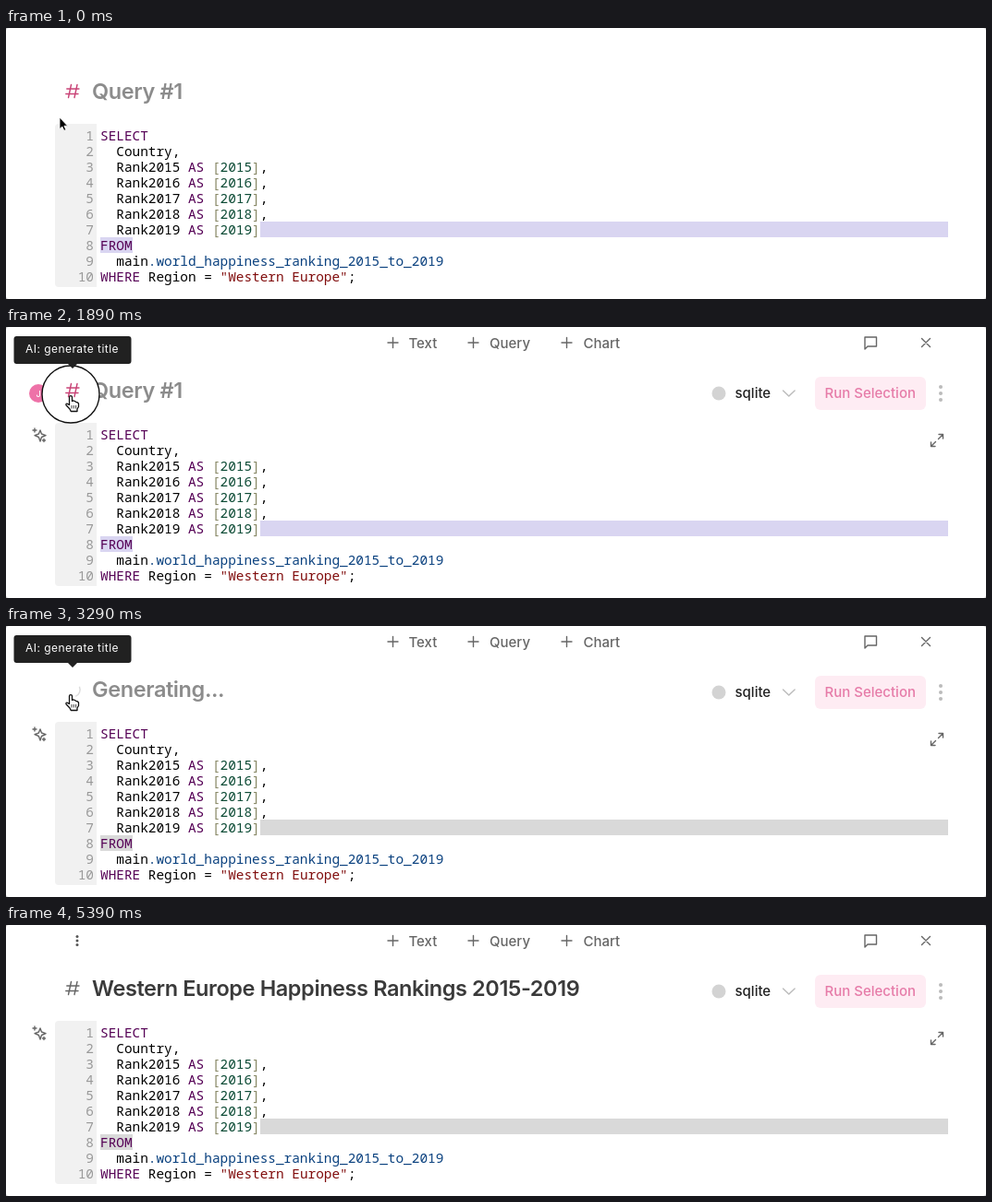
An HTML page that plays this animation: 1060 by 294 pixels, repeating every 5.67 s.

```html
<!DOCTYPE html>
<html lang="en">
<head>
<meta charset="utf-8">
<title>Generate a query title</title>
<style>
html, body { margin: 0; width: 100%; height: 100%; overflow: hidden; background: #c4c4c4; }
svg { display: block; width: 1060px; height: 294px; font: 500 15px Inter, sans-serif; }
text { white-space: pre; }
.line { fill: none; stroke: #666; stroke-width: 1.4; stroke-linecap: round; stroke-linejoin: round; }
.menu { fill: #666; }
.code { font: 500 14.4px "Noto Sans Mono", monospace; fill: #000; }
.num { fill: #999; font-weight: 400; text-anchor: end; }
.k { fill: #505; }
.n { fill: #0b4a34; }
.b { fill: #886; }
.v { fill: #0a417f; }
.s { fill: #800c0c; }
#title { font-size: 23.5px; font-weight: 600; letter-spacing: -.4px; }
#tip text { font-size: 12px; font-weight: 400; letter-spacing: .45px; fill: #fff; }
</style>
</head>
<body>
<svg viewBox="0 0 1060 294">
  <rect width="1060" height="294" rx="3" fill="#fff"/>
  <path d="M98 104H57a4 4 0 0 0-4 4V277a4 4 0 0 0 4 4H98z" fill="#f1f1f1"/>
  <path id="selection" d="M275 210H1019V227H275zM102 227H137V244H102z"/>
  <g id="code" class="code"></g>
  <text id="title" x="93" y="77"></text>

  <g id="controls">
    <g fill="#555"><circle cx="77" cy="12.5" r="1.5"/><circle cx="77" cy="17" r="1.5"/><circle cx="77" cy="21.5" r="1.5"/></g>
    <path class="line" d="M413 17h11m-5.5-5.5v11M500 17h11m-5.5-5.5v11M601 17h11m-5.5-5.5v11"/>
    <g class="menu"><text x="435.500" y="22.5">Text</text><text x="523" y="22.5">Query</text><text x="624.500" y="22.5">Chart</text></g>
    <path class="line" d="M929 11h12.5v10H932l-3 3zM990.5 12.500l9 9m0-9l-9 9"/>
    <circle cx="771" cy="72" r="7.5" fill="#d3d3d3"/>
    <text x="788.500" y="77" fill="#222">sqlite</text>
    <path class="line" style="stroke:#bbb" d="M840.500 69l6.300 6 6.300-6"/>
    <rect x="875" y="54" width="120" height="36" rx="6" fill="#feecf3"/>
    <text x="885.500" y="77" fill="#e67ba8">Run Selection</text>
    <g fill="#bbb"><circle cx="1011" cy="65" r="2"/><circle cx="1011" cy="72" r="2"/><circle cx="1011" cy="79" r="2"/></g>
    <path class="line" d="M1008.500 121.500l5-5m-4.500 0h4.500v4.500M1005.500 124.500l-5 5m0-4.500v4.500h4.500"/>
    <path class="line" d="M37 112l1.500 4 4.500 1.700-4.500 1.800-1.500 4.500-1.600-4.500-4.400-1.800 4.400-1.700zM31 110v4m-2-2h4M41 121.500v3m-1.500-1.500h3"/>
  </g>

  <g id="avatar">
    <circle cx="35" cy="72" r="10" fill="#ee72a8"/>
    <text x="35" y="75.500" text-anchor="middle" fill="#fff" style="font-size:9px">J</text>
  </g>
  <circle id="ring" cx="70" cy="73" fill="#fff" stroke="#111" stroke-width="1.400"/>
  <path id="hash" class="line" d="M70.500 61.500l-3 14M77 61.500l-3 14M65.800 66H79M64.800 71.500H78"/>
  <path id="spinner" d="M66.300 74.700A8 8 0 0 1 66.300 63.300" fill="none" stroke="#ddd" stroke-width="1.500"/>
  <g id="tip">
    <path d="M11.500 10H132.500a3 3 0 0 1 3 3V37a3 3 0 0 1-3 3H77l-5 5-5-5H11.500a3 3 0 0 1-3-3V13a3 3 0 0 1 3-3z" fill="#212121"/>
    <text x="21" y="28">AI: generate title</text>
  </g>

  <g id="cursor">
    <path id="arrow" d="M0 0V12.500L2.800 10 4.800 14.300 6.800 13.400 4.900 9.200H8.600z" stroke="#fff" stroke-width=".8"/>
    <g id="hand" stroke="#111" stroke-width="1.300" stroke-linejoin="round">
      <path fill="#fff" d="M-1.500 10V1.600a1.500 1.500 0 0 1 3 0V6l1.300-.6 1.700.6 1.100.8 1.700.5 1.200 1.200V12l-1.500 2.500V17H.2L-1 14.500-4.800 10.500c-1-1.400.5-2.600 1.800-1.400z"/>
      <path d="M1 10.500v3.500m2.300-3.500v3.500m2.300-3.500v3.500" stroke-width=".8"/>
    </g>
    <path id="beam" d="M-3.500-5q2.500 0 3.500 2 1-2 3.500-2M0-3V4M-3.500 6q2.500 0 3.500-2 1 2 3.500 2M-2 1.500H2" fill="none" stroke="#111" stroke-width="1.200"/>
  </g>
</svg>
<script>
const $ = id => document.getElementById(id);
const set = (id, attrs) => { for (const key in attrs) $(id).setAttribute(key, attrs[key]); };
const show = (id, on) => set(id, { opacity: +on });
const ramp = (t, from, to) => Math.min(1, Math.max(0, (t - from) / (to - from)));
const mix = (a, b, p) => a + (b - a) * p;
const span = (name, text) => `<tspan class="${name}">${text}</tspan>`;

const rankLine = (year, end) =>
  `  Rank${year} ${span("k", "AS")} ${span("b", "[")}${span("n", year)}${span("b", "]")}${end}`;
const lines = [
  span("k", "SELECT"),
  "  Country,",
  ...[2015, 2016, 2017, 2018, 2019].map(year => rankLine(year, year < 2019 ? "," : "")),
  span("k", "FROM"),
  "  main" + span("v", ".world_happiness_ranking_2015_to_2019"),
  `${span("k", "WHERE")} Region = ${span("s", '"Western Europe"')};`
];
$("code").innerHTML = lines.map((line, i) => {
  const y = 122 + i * 17;
  return `<text class="num" x="95" y="${y}">${i + 1}</text><text x="102" y="${y}">${line}</text>`;
}).join("");

const LOOP = 5670, STEP = 70;
const HOVER = 140, PRESS = 1890, GENERATE = 2520, DONE = 3780, LEAVE = 4620;

function drawCursor(t) {
  const enter = ramp(t, 0, 280);
  const exit = Math.max(0, (t - LEAVE + STEP) / 350) ** 2;
  const x = mix(mix(58, 70, enter), 517, exit);
  const y = mix(mix(97, 74.5, enter), 288, exit);
  const shape = x > 85 ? "beam" : enter < 1 ? "arrow" : "hand";
  for (const id of ["arrow", "hand", "beam"]) show(id, id === shape);
  set("cursor", { transform: `translate(${x} ${y})` });
}

function draw(t) {
  const generating = t >= GENERATE && t < DONE;
  const done = t >= DONE;
  $("title").textContent = done ? "Western Europe Happiness Rankings 2015-2019"
    : generating ? "Generating..." : "Query #1";
  set("title", { fill: done ? "#3a3a3a" : "#8c8c8c" });
  set("selection", { fill: t > PRESS ? "#d9d9d9" : "#d9d5f1" });
  show("controls", t >= HOVER);
  show("avatar", t >= 490 && t < GENERATE);

  $("hash").style.stroke = !done ? "#c94477" : t < LEAVE + STEP ? "#b8b8b8" : "#666";
  show("hash", !generating);
  show("spinner", generating);
  set("spinner", { transform: `rotate(${(t - 2730) * 0.36} 72 69)` });

  const pulse = ramp(t, PRESS, 2170);
  set("ring", { r: mix(31, 36, pulse), opacity: t < PRESS ? 0 : 1 - pulse });
  set("tip", { opacity: ramp(t, 300, 530) * (1 - ramp(t, 4760, 5000)) });
  drawCursor(t);
}

const start = performance.now();
function tick() {
  const t = (performance.now() - start) % LOOP;
  draw(Math.floor(t / STEP) * STEP);
  requestAnimationFrame(tick);
}
tick();
</script>
</body>
</html>
```
